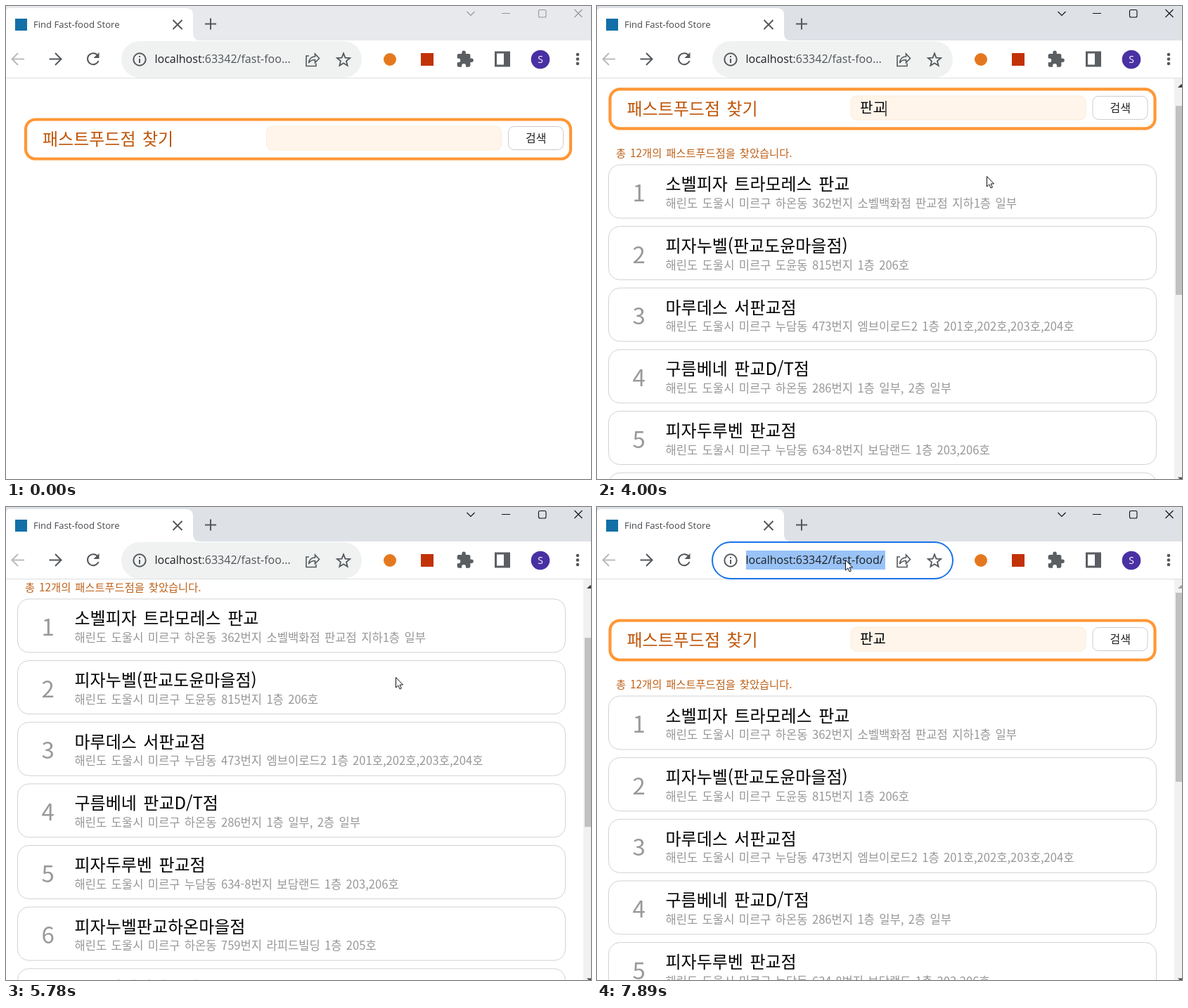
Animation, 832 px wide and 673 px high, one loop 8000 ms. Source, as an HTML page:

```html
<!DOCTYPE html>
<html lang="ko">
<head>
<meta charset="utf-8">
<title>Find Fast-food Store</title>
<style>
  html, body { margin: 0; width: 100%; height: 100%; overflow: hidden; background: #fff; }
  svg { display: block; width: 832px; height: 673px; }
  text { font-family: "Open Sans", "Noto Sans", sans-serif; white-space: pre; }
  .page text { font-family: "Noto Sans CJK KR", "Noto Sans CJK", sans-serif; font-weight: 350; word-spacing: .115em; }
  .line { fill: none; stroke: #54585c; stroke-width: 2; }
  .card rect { fill: #fff; stroke: #d2d2d2; }
  .num { font-size: 33px; fill: #999; }
  .name { font-size: 24px; fill: #000; }
  .page .addr { font-size: 16.6px; fill: #979797; word-spacing: .1em; }
  .pager { font-size: 19px; fill: #a0591e; }
  .pager .current { font-weight: 700; fill: #dcae50; }
</style>
</head>
<body>
<svg viewBox="0 0 832 673">
  <defs>
    <clipPath id="view"><rect y="103" width="832" height="570"/></clipPath>
  </defs>

  <g class="page" clip-path="url(#view)">
    <g id="content">
      <rect x="28" y="161.500" width="775" height="56" rx="14" fill="#fff" stroke="#ff9736" stroke-width="4.2"/>
      <text x="52" y="198" font-size="24" fill="#bf5508">패스트푸드점 찾기</text>
      <rect x="370.5" y="171" width="334" height="34" rx="8" fill="#fff5ea" stroke="#fbecd9"/>
      <rect x="714.5" y="171.5" width="78" height="33" rx="8" fill="#fff" stroke="#ccc"/>
      <text x="739" y="194" font-size="16" fill="#222">검색</text>
      <text id="query" x="383.5" y="195" font-size="20"></text>
      <rect id="underline" y="199" width="18" height="1"/>
      <rect id="caret" y="178" width="1.2" height="22"/>
      <g id="results">
        <text x="36.5" y="258" font-size="15.3" fill="#bf6118">총 12개의 패스트푸드점을 찾았습니다.</text>
        <g id="cards"></g>
        <g class="pager">
          <text x="344.5" y="1179">이전</text>
          <text class="current" x="396" y="1179">1</text>
          <text x="415" y="1179" fill="#8f4a10">2</text>
          <text x="442.5" y="1179">다음</text>
        </g>
      </g>
    </g>
    <g id="scrollbar">
      <rect x="821" y="103" width="11" height="570" fill="#f1f1f1"/>
      <rect id="thumb" x="823" width="15" height="269" fill="#c1c1c1"/>
      <path id="up" d="M826 116l5-5 5 5z"/>
      <path d="M826 670.500h10l-5 5z" fill="#505050"/>
    </g>
  </g>

  <rect id="strip" width="832" height="49"/>
  <path d="M0 49V7q1-4 6-4H256q10 0 10 10V39q0 10 10 10z" fill="#fff"/>
  <rect y="49" width="832" height="53" fill="#fff"/>
  <rect y="102" width="832" height="1" fill="#dcdee1"/>
  <rect x="13" y="18" width="17" height="17" fill="#126fa8"/>
  <text x="39" y="31" font-size="13.1" fill="#45484c">Find Fast-food Store</text>
  <path class="line" d="M237.500 20l13 13m0-13l-13 13M283 25.500h16m-8-8v16"/>
  <g id="controls" fill="none" stroke-width="1.1">
    <path d="M655.500 8l5.500 5.500L666.500 8M705 10.500h12M808.500 5l11 11m0-11l-11 11"/>
    <rect x="757.500" y="5.500" width="10.500" height="10.500" rx="2"/>
  </g>

  <path class="line" d="M26 75.500H9m8-8.500l-8.500 8.500L17 84" style="stroke:#b9bbbe"/>
  <path class="line" d="M61.500 75.500H78m-8-8.500l8.500 8.500L70 84"/>
  <path class="line" d="M130.500 70.500A8 8 0 1 0 131.500 78"/>
  <path d="M132.500 66v8h-8z" fill="#54585c"/>

  <rect id="pill" x="164" y="50" width="342" height="52" rx="26"/>
  <circle class="line" cx="190" cy="76" r="8.700"/>
  <path class="line" d="M190 75v6m0-10v2"/>
  <rect id="selection" x="212" y="62" width="198" height="27" fill="#99c3f7"/>
  <text id="url" x="211.500" y="81" font-size="16" fill="#202124"></text>
  <path class="line" d="M431 71h-4v14.500h14v-4M430.500 81q1-9 9-9v-4l6 6.500-6 6v-4q-6 0-9 4.500z" style="stroke-width:1.6"/>
  <path id="star" class="line" style="stroke-width:1.8"/>

  <circle cx="546" cy="76" r="9" fill="#e5781e"/>
  <rect x="590" y="67" width="18" height="18" fill="#c23208"/>
  <path transform="translate(639.500 62.500) scale(1.1)" fill="#5a5e62" d="M20.5 11H19V7c0-1.100-.9-2-2-2h-4V3.500a2.500 2.500 0 0 0-5 0V5H4c-1.100 0-2 .9-2 2v3.800h1.500a2.700 2.700 0 0 1 0 5.400H2V20c0 1.100.9 2 2 2h3.800v-1.500a2.700 2.700 0 0 1 5.400 0V22H17c1.100 0 2-.9 2-2v-4h1.500a2.500 2.500 0 0 0 0-5z"/>
  <path fill="#5a5e62" fill-rule="evenodd" d="M695 64.500h22v22h-22zm3 3v16h10v-16z"/>
  <circle cx="760" cy="76" r="13.300" fill="#4930a3"/>
  <text x="760" y="81" font-size="14" fill="#fff" text-anchor="middle">S</text>
  <g fill="#54585c"><circle cx="813" cy="69" r="2.300"/><circle cx="813" cy="75.500" r="2.300"/><circle cx="813" cy="82" r="2.300"/></g>

  <path id="arrow" d="M.5.5v14.500l3.300-3.100 2.300 5.100 2.300-1-2.300-5h4.400z" fill="#fff" stroke="#111"/>
  <path id="beam" d="M-3.500-6.500h2.500l1 1 1-1h2.500M0-5.500v11M-3.500 6.500h2.500l1-1 1 1h2.500" fill="none" stroke="#111"/>
</svg>

<script>
const LOOP = 8000;
const FOCUS = 1500, CARET = 1570, COMMIT = 2690, RESULTS = 3440, SELECT = 7750;
const BLINK = 530, CARD_TOP = 268.5, CARD_PITCH = 87.65;

const REGION = '해린도 도울시 미르구 ';
const stores = [
  ['소벨피자 트라모레스 판교', '하온동 362번지 소벨백화점 판교점 지하1층 일부'],
  ['피자누벨(판교도윤마을점)', '도윤동 815번지 1층 206호'],
  ['마루데스 서판교점', '누담동 473번지 엠브이로드2 1층 201호,202호,203호,204호'],
  ['구름베네 판교D/T점', '하온동 286번지 1층 일부, 2층 일부'],
  ['피자두루벤 판교점', '누담동 634-8번지 보담랜드 1층 203,206호'],
  ['피자누벨판교하온마을점', '하온동 759번지 라피드빌딩 1층 205호'],
  ['구름베네서판교점', '도윤동 827번지 코랄프라자 1층 201호,202호,203호'],
  ['타로벨피자판교점', '누담동 368번지 루나텐즈밸리 203호,205호,206호'],
  ['호밀그루동판교점', '다솔동 592번지 누보리에버타워 1-24,25,26,38,39호 2- 6,12호'],
  ['브렌델누리 판교다솔점', '다솔동 843번지 솔담마을 비이상가동']
];

const typing = [[0, ''], [2030, 'ㅍ'], [2100, '파'], [2220, '판'], [2360, '판ㄱ'], [2490, '판교']];

// [time, value...] keys, linear in between
const scrollPath = [
  [3930, 0], [4000, 42.2], [4070, 105], [4140, 165], [4210, 195], [4300, 195], [4340, 250],
  [4410, 420], [4480, 536], [4550, 570], [4620, 580], [5320, 580], [5370, 540], [5440, 400],
  [5510, 270], [5580, 200], [5740, 200], [5780, 138.5], [5850, 108], [5990, 85], [6060, 42], [6130, 11.3], [6200, 0]
];
const cursorPath = [
  [530, 749, 590], [740, 706, 470], [950, 630, 290], [1100, 590, 212], [1230, 578, 196],
  [3580, 578, 196], [3860, 554, 242], [6250, 554, 242], [6580, 640, 182],
  [6860, 690, 150], [7410, 560, 124], [7700, 353, 75]
];

const $ = id => document.getElementById(id);
const set = (id, attrs) => { for (const k in attrs) $(id).setAttribute(k, attrs[k]); };
const show = (id, on) => { $(id).style.display = on ? '' : 'none'; };

function sample(path, t) {
  const next = path.findIndex(key => key[0] > t);
  if (next === 0) return path[0].slice(1);
  if (next < 0) return path[path.length - 1].slice(1);
  const a = path[next - 1], b = path[next], f = (t - a[0]) / (b[0] - a[0]);
  return a.slice(1).map((v, i) => v + (b[i + 1] - v) * f);
}

$('cards').innerHTML = stores.map(([name, address], i) => {
  const x = i < 9 ? 107 : 125.5;
  return `<g class="card" transform="translate(0 ${CARD_TOP + i * CARD_PITCH})">
    <rect x="26" y=".5" width="779" height="76" rx="16"/>
    <text class="num" x="60" y="52.500">${i + 1}</text>
    <text class="name" x="${x}" y="37">${name}</text>
    <text class="addr" x="${x}" y="61.500">${REGION}${address}</text></g>`;
}).join('');

const starPoints = Array.from({ length: 10 }, (_, i) => {
  const r = i % 2 ? 4.2 : 9.6, a = i * Math.PI / 5;
  return `${480 + r * Math.sin(a)} ${77 - r * Math.cos(a)}`;
});
set('star', { d: `M${starPoints.join('L')}z` });

function drawWindow(t) {
  const active = t >= FOCUS, selected = t >= SELECT;
  set('strip', { fill: active ? '#dee1e6' : '#e7e9ed' });
  set('controls', { stroke: active ? '#111' : '#949698' });
  set('pill', selected
    ? { fill: '#fff', stroke: '#1a73e8', 'stroke-width': 2 }
    : { fill: '#f0f2f2', stroke: 'none' });
  show('selection', selected);
  const url = selected
    ? 'localhost:63342/fast-food/'
    : 'localhost<tspan fill="#505458">:63342/fast-foo...</tspan>';
  if ($('url').dataset.state !== String(selected)) {
    $('url').innerHTML = url;
    $('url').dataset.state = selected;
  }
}

function drawQuery(t) {
  const text = typing.filter(key => key[0] <= t).pop()[1];
  const end = 383.5 + text.length * 18.4;
  $('query').textContent = text;
  set('underline', { x: end - 18.4 });
  show('underline', text && t < COMMIT);
  set('caret', { x: end - .5 });
  const lit = t < COMMIT + 550 || Math.floor((t - COMMIT - 20) / BLINK) % 2 === 0;
  show('caret', t >= CARET && t < SELECT && lit);
}

function drawPage(t, scroll, shift) {
  set('content', { transform: `translate(${shift} ${-scroll})` });
  show('results', t >= RESULTS);
  show('scrollbar', t >= RESULTS);
  set('thumb', { y: 122 + scroll * .4646 });
  set('up', { fill: scroll > 0 ? '#404040' : '#a3a3a3' });
}

function drawCursor(t, scroll, shift) {
  const [x, y] = sample(cursorPath, t);
  const left = 370 + shift, top = 171 - scroll;
  const inInput = x > left && x < left + 335 && y > top && y < top + 34;
  for (const id of ['arrow', 'beam']) {
    set(id, { transform: `translate(${x} ${y})` });
    show(id, t >= 530 && inInput === (id === 'beam'));
  }
}

function draw(t) {
  const [scroll] = sample(scrollPath, t);
  const shift = t >= RESULTS ? -9.5 : 0;
  drawWindow(t);
  drawQuery(t);
  drawPage(t, scroll, shift);
  drawCursor(t, scroll, shift);
}

const start = performance.now();
function tick() {
  draw((performance.now() - start) % LOOP);
  requestAnimationFrame(tick);
}
tick();
</script>
</body>
</html>
```
